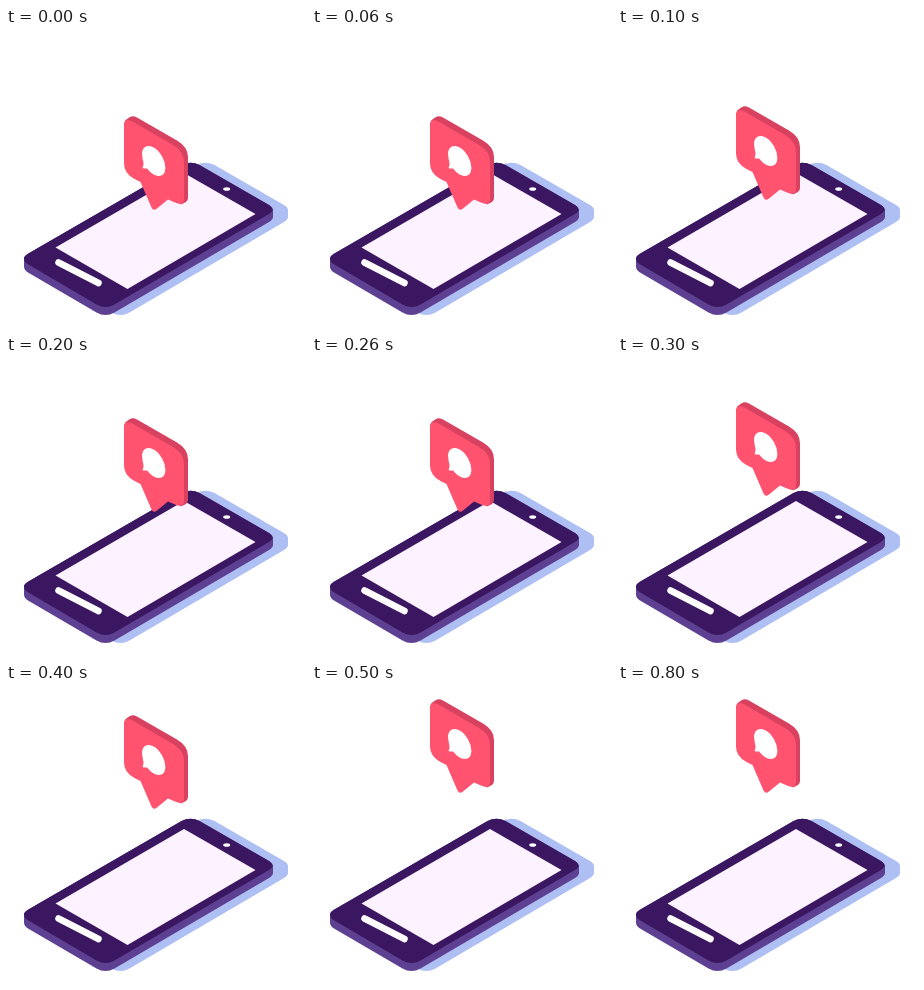
An HTML page without scripts that plays this animation: 300 by 300 pixels, repeating every 1000 ms.

```html
<!DOCTYPE html>
<html lang="en">
<head>
<meta charset="utf-8">
<title>Phone notification</title>
<style>
  html, body { margin: 0; width: 100%; height: 100%; overflow: hidden; background: #fff; }
  svg { display: block; width: 100%; height: 100%; }
  .bubble { animation: rise 1s step-end infinite; }
  @keyframes rise {
    0%   { transform: translateY(0); }
    10%  { transform: translateY(-10px); }
    20%  { transform: translateY(-26px); }
    30%  { transform: translateY(-42px); }
    40%  { transform: translateY(-57px); }
    50%, 100% { transform: translateY(-73px); }
  }
</style>
</head>
<body>
<svg viewBox="0 0 300 300">
  <defs>
    <path id="slab" d="M18 230Q18 228 21.500 226L175.500 137Q184.500 132.500 193.500 137L263 177Q267 179.500 267 182V189Q267 191.500 263 194L108.500 284.500Q99.500 289.500 90.500 284.500L22 244.500Q18 242 18 238.500Z"/>
  </defs>

  <!-- phone -->
  <use href="#slab" x="15" fill="#aebff3"/>
  <use href="#slab" fill="#5d4092"/>
  <path fill="#3b1761" d="M21.500 226L175.500 137Q184.500 132.500 193.500 137L263 177Q270 181.500 263 186L108.500 276.500Q99.500 281.500 90.500 276.500L21.500 236Q14.500 231 21.500 226Z"/>
  <path fill="#fdf2ff" d="M178 145L249.500 186L121.500 261L49.500 219.500Z"/>
  <path fill="none" stroke="#fff" stroke-width="6.500" stroke-linecap="round" d="M52.500 234.500L92.500 255"/>
  <ellipse cx="220.700" cy="161" rx="3.500" ry="1.800" fill="#fff"/>

  <!-- speech bubble -->
  <g class="bubble">
    <path fill="#d8415f" d="M118 98Q118 92.500 121 91L124 89Q127 87.500 131 89.500L171 112.500Q182 119 182 129V170Q182 172.500 180 174L175 176.500L150 150Z"/>
    <path fill="#ff536f" d="M118 98Q118 89 126.500 93.500L167 117Q178 123.500 178 134V171Q178 178.500 169 174.500L162 171.500L151 180.500Q147.500 183.500 145.500 179.500L134.500 154L128.500 151Q118 145.500 118 135.500Z"/>
    <g fill="#fff">
      <circle r="13.500" transform="matrix(.866 .5 0 1 147.700 133)"/>
      <path d="M136.500 130Q138.500 136 136.500 140Q139.500 141 142 140Z"/>
    </g>
  </g>
</svg>
</body>
</html>
```
